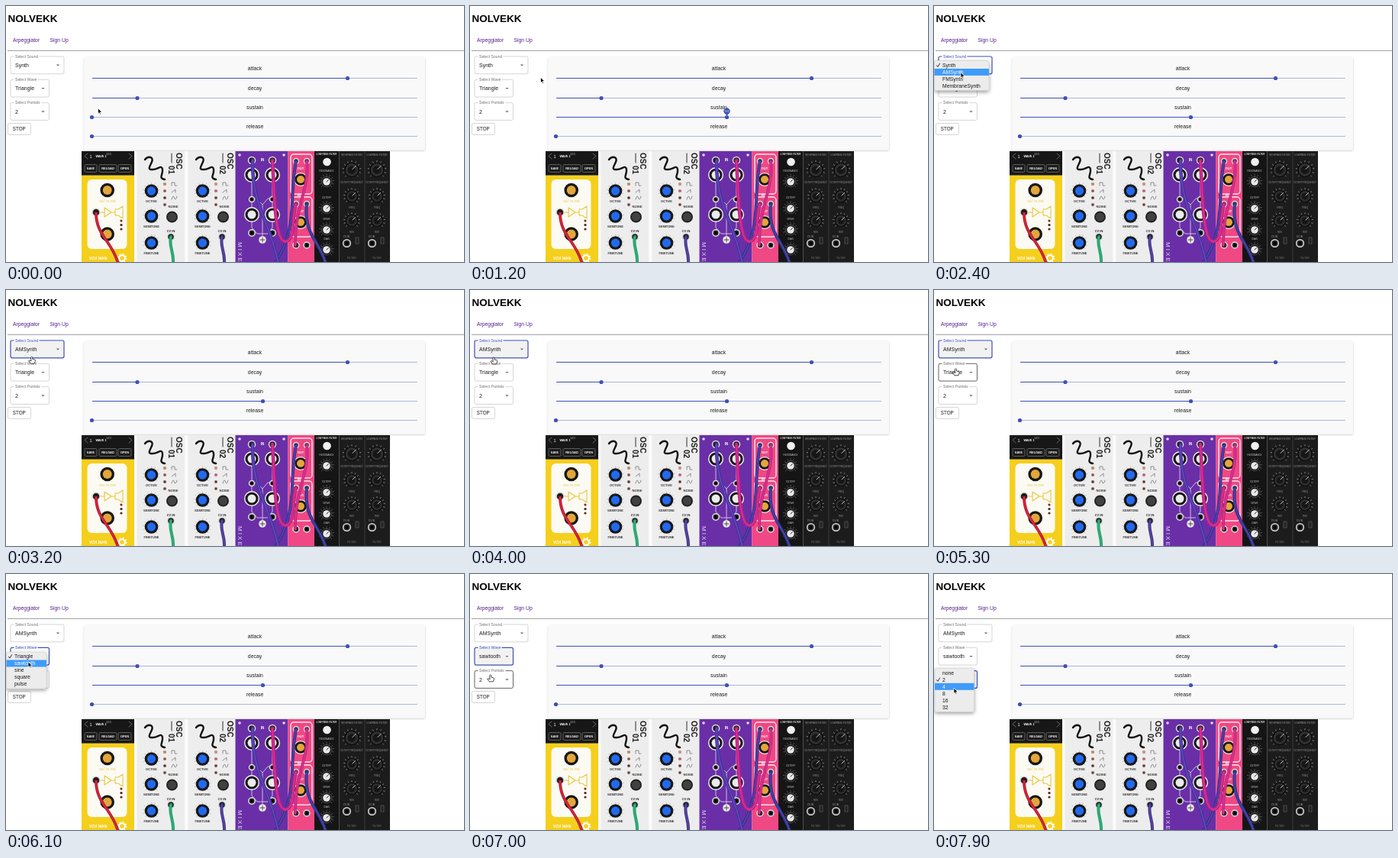
Recreate the animation shown at these times as an HTML page. Size 600 px wide and 335 px high, loop 8000 ms.

```html
<!DOCTYPE html>
<html lang="en">
<head>
<meta charset="utf-8">
<title>Synth page</title>
<style>
html, body { margin: 0; width: 100%; height: 100%; overflow: hidden; background: #fff; }
svg { display: block; width: 600px; height: 335px; font-family: "Liberation Sans", Arial, sans-serif; }
</style>
</head>
<body>
<svg viewBox="0 0 600 335">
  <defs>
    <filter id="shadow" x="-5%" y="-10%" width="110%" height="120%">
      <feDropShadow dx="0" dy=".8" stdDeviation="1" flood-opacity=".25"/>
    </filter>
    <filter id="pop" x="-20%" y="-20%" width="140%" height="150%">
      <feDropShadow dx="0" dy="2" stdDeviation="2.5" flood-opacity=".4"/>
    </filter>
    <clipPath id="rack"><rect x="99" y="190" width="404" height="145"/></clipPath>
  </defs>
  <g id="page"></g>
  <g id="modules" clip-path="url(#rack)"></g>
  <g id="live"></g>
</svg>
<script>
const LOOP = 8000, BLUE = '#3f51b5';
const $ = id => document.getElementById(id);

const rect = (x, y, w, h, fill, more = '') =>
  `<rect x="${x}" y="${y}" width="${w}" height="${h}" fill="${fill}" ${more}/>`;
const dot = (x, y, r, fill, stroke = 'none', w = 1) =>
  `<circle cx="${x}" cy="${y}" r="${r}" fill="${fill}" stroke="${stroke}" stroke-width="${w}"/>`;
const path = (d, stroke, w = 1, fill = 'none') =>
  `<path d="${d}" stroke="${stroke}" stroke-width="${w}" fill="${fill}" stroke-linecap="round" stroke-linejoin="round"/>`;
const text = (s, x, y, size, fill = '#1c1c1c', more = '') =>
  `<text x="${x}" y="${y}" font-size="${size}" fill="${fill}" ${more}>${s}</text>`;
const mid = (s, x, y, size, fill, more = '') =>
  text(s, x, y, size, fill, 'text-anchor="middle" ' + more);
const BOLD = 'font-weight="bold"';

// ---- modular rack ----
const jack = (x, y, r = 4) => dot(x, y, r, '#222', '#ddd', 1.5) + dot(x, y, r * .4, '#000');
const cable = (d, color, w = 4) => path(d, color, w) + path(d, 'rgba(255,255,255,.14)', w * .3);

function ticks(x, y, r, color) {
  let d = '';
  for (let i = 0; i <= 10; i++) {
    const a = (135 + i * 27) * Math.PI / 180, c = Math.cos(a), s = Math.sin(a);
    d += `M${x + c * r} ${y + s * r}L${x + c * (r + 1.5)} ${y + s * (r + 1.5)}`;
  }
  return path(d, color, .6);
}

const knob = (x, y, r, cap) => dot(x, y, r, '#171717') + dot(x, y, r * .64, cap);

function sequencer() {
  const gold = '#e8c83c';
  let s = rect(99, 190, 69, 32, '#171717') + rect(99, 221.5, 69, 114, '#f5cf1d');
  s += path('M107 193L103 196.500L107 200M161 193L165 196.500L161 200', '#888', .7);
  s += text('1', 109.5, 198.5, 5.5, '#fff') + text('WAVE 1', 117.5, 198, 3.8, '#fff', BOLD);
  s += text('123', 131, 194.500, 4, '#bbb');
  [['SAVE', 103, 16], ['RELOAD', 122, 23], ['OPEN', 147, 17]].forEach(([label, x, w]) => {
    s += rect(x, 207.5, w, 10, '#1c1c1c', 'rx="1.500" stroke="#777" stroke-width=".7"') +
      mid(label, x + w / 2, 214.1, 3.9, '#fff', BOLD);
  });
  s += rect(106.5, 227, 52, 91, '#fbfaf3', 'rx="6"');
  s += knob(132.7, 241, 9.3, '#e3a63c') + knob(132.7, 298.5, 9.3, '#e3a63c');
  s += mid('OSC FILTER', 132.7, 256.500, 3.8, gold);
  s += path('M122 270H129M129 264L138 270L129 276ZM138 270H143M143 266H147L153 262V278L147 274H143Z', gold, 1.1);
  s += jack(118, 270, 5);
  s += dot(151, 281, 1.6, '#8c2a1c') + dot(151, 286.5, 1.6, '#4a1c18') + dot(151, 292, 1.6, '#6b2418');
  s += text('VOX MAN', 109, 332, 5, '#fff', BOLD);
  s += dot(152, 330, 3.8, 'none', '#fff', 2) +
    `<circle cx="152" cy="330" r="5.500" fill="none" stroke="#fff" stroke-width="1.500" stroke-dasharray="2.160"/>`;
  return s + cable('M118 271C118 300 139 308 147 337', '#c2172e', 3.8);
}

function oscillator(x, number, leds, color) {
  let s = rect(x - 2, 190, 67, 145, '#fafafa') + rect(x + 1.5, 190, 62.5, 145, '#ededee');
  s += path(`M${x + 12} 201C${x + 16} 196 ${x + 24} 197 ${x + 21} 204S${x + 15} 214 ${x + 22} 214` +
    `S${x + 34} 207 ${x + 35} 214S${x + 29} 225 ${x + 38} 227`, '#111', 2.4);
  const side = (label, dx, y) =>
    `<text transform="translate(${x + dx} ${y}) rotate(90)" font-size="10" ${BOLD} fill="#1a1a1a">${label}</text>`;
  s += side('OSC', 53, 192) + side(number, 43, 209) + path(`M${x + 47} 193V205`, '#1a1a1a', .9);
  [[242, 'OCTIVE'], [275, 'SEMITONE'], [310, 'FINETUNE']].forEach(([y, label]) => {
    s += ticks(x + 20.5, y, 9.5, '#aaa') + knob(x + 20.5, y, 8.8, '#2269ee') +
      mid(label, x + 20.5, y + 15, 4, '#333', BOLD);
  });
  leds.forEach((c, i) => s += dot(x + 38, 233 + i * 9, 1.8, c, '#777', .4));
  const glyph = (d, i) => path(`M${x + 47} ${235 + i * 9}${d}`, '#666', .7);
  s += glyph('v-4h4v4h3', 0) + glyph('l5 -4v4', 1) + glyph('q2 -7 3.500 -2t3.500 -2', 2);
  s += mid('NOISE', x + 49, 263.5, 4.2, '#333', BOLD);
  s += dot(x + 47.5, 276, 7.5, '#222') + dot(x + 47.5, 276, 5.5, '#414141');
  s += mid('CV IN', x + 46, 295.5, 4, '#222', BOLD) + jack(x + 46, 302, 4.5);
  return s + cable(`M${x + 46} 302C${x + 43} 315 ${x + 50} 321 ${x + 49} 336`, color, 4);
}

function mixer() {
  let s = rect(300.5, 190, 69, 145, '#6a2fa6');
  s += path('M322 202V273M349 202V273M322 252H328L336 260L343 252H349M322 273V290L329 298H343L349 290V273M336 260V306', '#d9c8ee', .9);
  for (const x of [322, 349]) {
    for (const y of [221, 273]) s += dot(x, y, 10, '#f4f2f6') + knob(x, y, 8.6, '#ececec');
    s += jack(x, 202, 4.5) + jack(x, 253, 3.5) + jack(x, 297, 4.2);
  }
  s += dot(306, 195, 1.8, '#ddd') + dot(364, 195, 1.8, '#ddd') + mid('IN', 336, 203, 4.5, '#fff', BOLD);
  s += dot(336, 306, 4.8, '#f2f2f2') + path('M336 303V309M333 306H339', '#444', 1);
  return s + `<text transform="translate(304 309) rotate(90)" font-size="8" letter-spacing="2" fill="#e4d8f2">MIXER</text>`;
}

function envelope() {
  let s = rect(369.5, 190, 34.5, 145, '#ef4884');
  for (const y of [194, 250]) {
    s += rect(373, y, 28, 52, 'none', 'rx="4" stroke="#ffe3ec" stroke-width="1.500"');
    s += dot(386, y + 33, 9, '#fbeef1') + knob(386, y + 33, 7.8, '#e3a63c');
    s += jack(380, y + 9, 3.5) + jack(394, y + 9, 3.5);
    s += mid('OUT', 386, y + 20, 4, '#fff', BOLD);
  }
  return s + mid('SEQ', 386, 249, 4.2, '#fff', BOLD) + jack(380, 313, 4) + jack(394, 313, 4);
}

function filters() {
  let s = rect(404, 190, 33, 145, '#151515') + rect(437, 190, 66, 145, '#1c1c1c');
  s += mid('LOW PASS FILTER', 420, 195, 3, '#ddd', BOLD) + dot(420.5, 204, 5.3, '#f0f0f0');
  [230, 265, 293, 319].forEach((y, i) => {
    s += ticks(420, y, 8, '#888') + dot(420, y, 6.5, '#0a0a0a', '#999', .5) + dot(420, y, 4.8, '#e8e8e8') +
      path(`M420 ${y}L422.500 ${y - 2.5}`, '#333', 1);
    s += mid(['RESONANCE', 'CUTOFF', 'DRIVE', 'GAIN'][i], 420, y - 13, 3, '#ccc');
  });
  s += path('M436.500 190V335', '#777', .6) + path('M470 190V335', '#444', .8);
  [[453, 'HIGHPASS FILTER'], [486, 'LOWPASS FILTER']].forEach(([x, name]) => {
    s += mid(name, x, 196, 3.2, '#999');
    [[214.5, 9, 'CUTOFF FREQUENCY'], [249, 7.5, 'FREQ'], [281, 7.5, 'RES']].forEach(([y, r, label]) => {
      s += ticks(x, y, r + 1.5, '#ccc') + dot(x, y, r, '#303030', '#080808', 1.2) +
        dot(x, y, r * .6, '#161616') + path(`M${x + 1} ${y - 1}L${x + r * .6} ${y - r * .6}`, '#ddd', .9);
      s += mid(label, x, y + r + 8, 2.8, '#999');
    });
    s += text('CV IN', x - 11, 303, 3, '#aaa') + jack(x - 6.5, 310.5, 4.8);
    s += rect(x + 5, 303, 4, 8, '#222', 'stroke="#777" stroke-width=".5"');
    s += mid('FILTER', x, 331, 3.4, '#777');
  });
  return s;
}

$('modules').innerHTML = rect(99, 190, 404, 145, '#fafafa') + sequencer() +
  oscillator(170, '01', ['#df7b2b', '#a94826', '#602d20', '#7f3524'], '#20a36b') +
  oscillator(237, '02', ['#e58a55', '#e0495e', '#6d3025', '#873126'], '#42348f') +
  mixer() + envelope() + filters() +
  cable('M380 203C370 250 384 290 352 337', '#3a2f96', 4) +
  cable('M323 202C322 262 346 282 357 337', '#4a32a6', 4.5) +
  cable('M349 202C352 250 352 308 366 308S374 270 380 259', '#c81c83', 4.5) +
  cable('M394 203C398 240 378 262 379 313', '#c9227f', 3.8) +
  cable('M394 259C390 300 410 306 419 337', '#303191', 4);

// ---- fixed page parts ----
const TRACKS = [['attack', 83.5, 94.5, 447.5], ['decay', 109.5, 120.5, 172], ['sustain', 134.5, 145.5, 0], ['release', 160, 170.5, 112.5]];
$('page').innerHTML = text('NOLVEKK', 2.5, 21, 13.5, '#000', BOLD) +
  text('Arpeggiator', 9, 46.5, 6.8, '#551a8b') + text('Sign Up', 57.5, 46.5, 6.8, '#551a8b') +
  rect(2, 58, 598, 1, '#a2a2a2') +
  rect(102.5, 67, 446.5, 121.5, '#f9f9f9', 'rx="2" filter="url(#shadow)"') +
  TRACKS.map(([name, y]) => mid(name, 326, y, 6.9)).join('') +
  rect(2.5, 153.5, 30, 15, '#fff', 'rx="2" stroke="#c4c4c4" stroke-width=".7"') + mid('STOP', 17.3, 163.2, 6.3);

// ---- moving parts ----
const POINTER = [[0, 120.5, 134], [200, 113, 146], [300, 112.5, 146], [900, 337, 146], [1000, 320, 140], [1200, 92.5, 93.5],
  [1600, 34, 78], [1800, 34, 79], [2200, 35, 87], [2700, 35, 87], [4000, 31, 88], [4700, 31, 88],
  [5300, 28.5, 103], [5800, 28.5, 107], [6100, 29, 115], [6600, 29, 115], [7200, 26, 138], [7500, 26, 139], [7800, 26, 149.5], [8000, 26, 149.5]];

function pointerAt(t) {
  const i = POINTER.findIndex(p => p[0] > t), [a, x, y] = POINTER[i - 1], [b, u, v] = POINTER[i];
  let k = (t - a) / (b - a);
  k = k * k * (3 - 2 * k);
  return [x + (u - x) * k, y + (v - y) * k];
}

const SELECTS = [
  { label: 'Select Sound', y: 66, w: 70, open: 1700, pick: 2600, blur: 5700, notch: 33,
    items: ['Synth', 'AMSynth', 'FMSynth', 'MembraneSynth'], from: 0, to: 1, top: 71.5, left: .5, menuW: 71.5 },
  { label: 'Select Wave', y: 96.3, w: 50.5, open: 5700, pick: 6500, blur: 7400, notch: 31,
    items: ['Triangle', 'sawtooth', 'sine', 'square', 'pulse'], from: 0, to: 1, top: 102, left: .5, menuW: 52.5 },
  { label: 'Select Partials', y: 126.6, w: 50.5, open: 7400, pick: 8000, blur: 8000, notch: 36,
    items: ['none', '2', '4', '8', '16', '32'], from: 1, to: 2, top: 123.3, left: 1, menuW: 51.5 }
];
const isOpen = (s, t) => t >= s.open && t < s.pick;

function select(s, t, hover) {
  const focus = t >= s.open && t < s.blur, picked = t >= s.pick;
  const stroke = focus ? BLUE : hover ? '#222' : '#c4c4c4', cx = s.w - 2;
  return rect(6, s.y, s.w, 22.8, focus && picked ? '#f2f2f2' : '#fff', `rx="2" stroke="${stroke}" stroke-width="${focus ? 1.2 : .7}"`) +
    rect(10.5, s.y - 1, s.notch, 2.2, '#fff') +
    text(s.label, 12, s.y + 1.8, 5.1, focus ? BLUE : '#757575') +
    text(s.items[picked ? s.to : s.from], 12, s.y + 13.9, 7) +
    `<path d="M${cx - 2.2} ${s.y + 10.6}h4.400l-2.200 2.200z" fill="#757575"/>`;
}

function menu(s, y) {
  const row = Math.max(0, Math.min(s.items.length - 1, Math.floor((y - s.top - 1.4) / 9)));
  let out = rect(s.left, s.top, s.menuW, s.items.length * 9 + 3, '#ececec', 'rx="2.500" filter="url(#pop)" stroke="#c6c6c6" stroke-width=".5"');
  s.items.forEach((item, i) => {
    const top = s.top + 1.5 + i * 9, color = i === row ? '#fff' : '#1a1a1a';
    if (i === row) out += rect(s.left, top, s.menuW, 9, '#3f9bfa');
    if (i === s.from) out += path(`M3.500 ${top + 4.8}l1.500 1.800l2.600 -4.400`, color, .9);
    out += text(item, 11, top + 6.9, 6.8, color);
  });
  return out;
}

function sliders(t, x) {
  const sustain = t < 300 ? 112.5 : t < 900 ? x : 336.5;
  let out = '';
  TRACKS.forEach(([name, , y, value]) => {
    const v = name === 'sustain' ? sustain : value;
    out += rect(113, y - .5, 426, 1, '#aeb5de') + rect(113, y - .5, Math.max(0, v - 113), 1, BLUE) + dot(v, y, 2.6, BLUE);
  });
  const scale = t < 200 ? 0 : t < 1100 ? 1 : t < 1200 ? .8 : t < 1300 ? .58 : 0;
  if (scale) {
    out += `<g transform="translate(${sustain} 142.500) scale(${scale})">` +
      `<path d="M0 1.500L-5 -3.500A7 7 0 1 1 5 -3.500Z" fill="${BLUE}"/>` +
      mid(((sustain - 112.5) / 426).toFixed(2), 0, -6.6, 5, '#fff') + '</g>';
  }
  return out;
}

function pointer(x, y, hand) {
  const d = hand
    ? 'M-1 .5Q0 -.8 1 .5V3L4 3.700Q5 4.200 4.600 6L3.500 8.800H-1.500L-4 5.300Q-3.300 4 -1 5.500Z'
    : 'M0 0V7L1.600 5.500L2.700 8L3.900 7.500L2.800 5.100H5Z';
  return `<g transform="translate(${x} ${y})">${path(d, hand ? '#111' : '#fff', .75, hand ? '#fff' : '#000')}</g>`;
}

function draw(now) {
  const t = Math.floor(now % LOOP / 100) * 100, [x, y] = pointerAt(t);
  const opened = SELECTS.find(s => isOpen(s, t));
  const over = s => !opened && x > 6 && x < 6 + s.w && y > s.y && y < s.y + 23;
  const onThumb = t >= 200 && t <= 900;
  $('live').innerHTML = sliders(t, x) + SELECTS.map(s => select(s, t, over(s))).join('') +
    (opened ? menu(opened, y) : '') + pointer(x, y, onThumb || SELECTS.some(over));
  requestAnimationFrame(draw);
}
requestAnimationFrame(draw);
</script>
</body>
</html>
```
